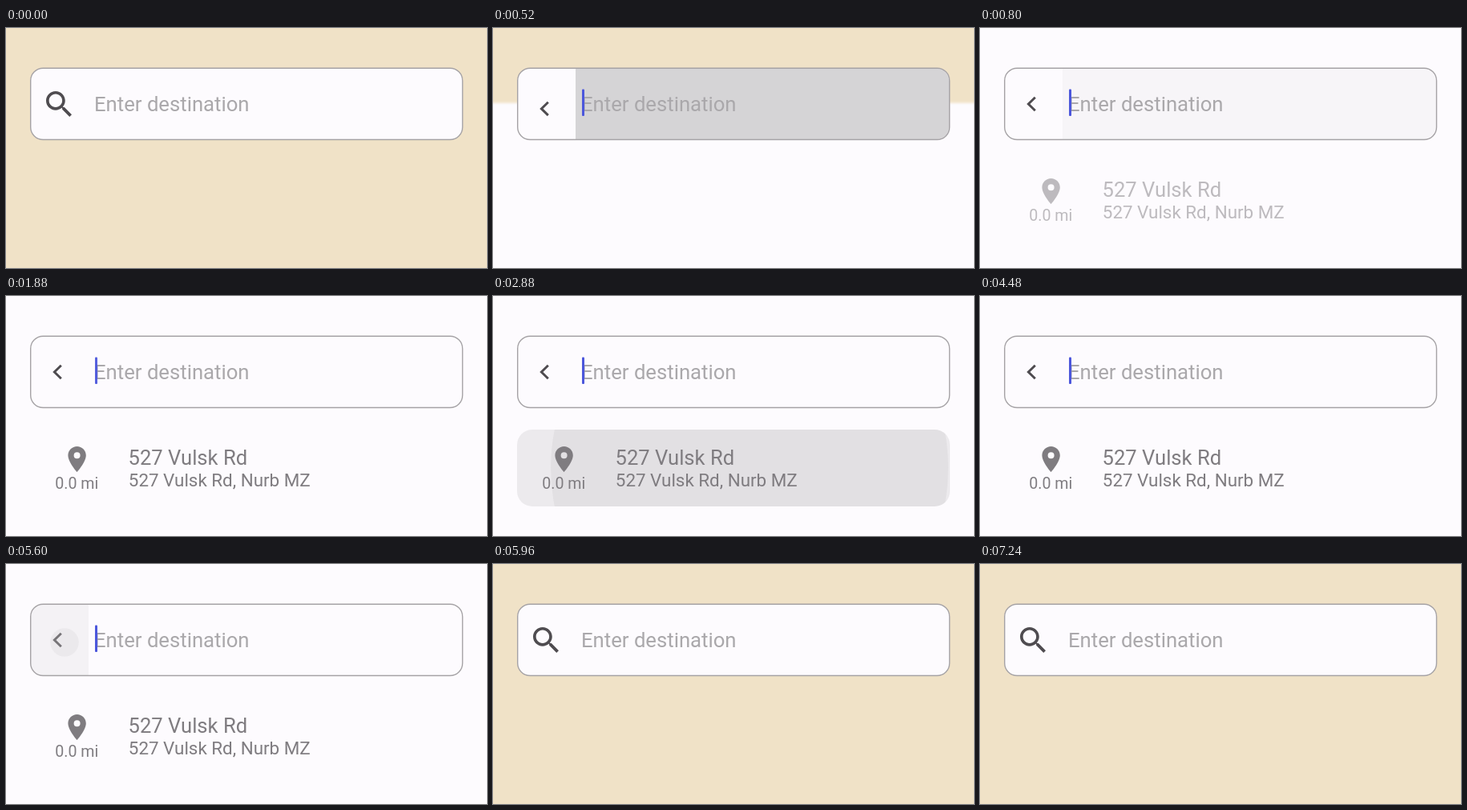
These frames come from a looping animation (600 px wide and 300 px high, 7.92 s). An HTML page:

```html
<!DOCTYPE html>
<html lang="en">
<head>
<meta charset="utf-8">
<title>Destination search</title>
<style>
  html, body { margin: 0; width: 100%; height: 100%; overflow: hidden; background: #f0e2c7; }
  svg { display: block; width: 100vw; height: 100vh; }
  text { font-family: Roboto, sans-serif; }
</style>
</head>
<body>
<svg viewBox="0 0 600 300">
  <defs>
    <clipPath id="inputClip"><path d="M103 51H554a15 15 0 0 1 15 15V124a15 15 0 0 1-15 15H103z"/></clipPath>
    <clipPath id="tileClip"><rect x="30" y="167" width="540" height="96" rx="19"/></clipPath>
    <clipPath id="backClip"><path d="M103 51H46a15 15 0 0 0-15 15V124a15 15 0 0 0 15 15H103z"/></clipPath>
    <filter id="soft" x="-5%" y="-5%" width="110%" height="110%"><feGaussianBlur stdDeviation="1.4"/></filter>
  </defs>

  <rect width="600" height="300" fill="#f0e2c7"/>
  <rect id="sheet" x="-20" width="640" height="340" fill="#fdfbfe" filter="url(#soft)"/>

  <g id="tilePress" clip-path="url(#tileClip)">
    <rect x="30" y="167" width="540" height="96" fill-opacity=".103"/>
    <circle cx="320" cy="215" fill-opacity=".066"/>
  </g>
  <g id="result" fill="#7f7c80">
    <path transform="translate(69.4 184.8) scale(1.6)" d="M12 2C8.13 2 5 5.13 5 9c0 5.25 7 13 7 13s7-7.75 7-13c0-3.87-3.13-7-7-7zm0 9.5a2.5 2.5 0 1 1 0-5 2.5 2.5 0 0 1 0 5z"/>
    <text x="88.3" y="241" font-size="19.6" text-anchor="middle">0.0 mi</text>
    <text x="152.6" y="211" font-size="25.6">527 Vulsk Rd</text>
    <text x="152.8" y="238" font-size="22.4">527 Vulsk Rd, Nurb MZ</text>
  </g>

  <rect x="30.7" y="50.2" width="538.8" height="89.3" rx="15.5" fill="#fdfbfe"/>
  <g id="inputPress" clip-path="url(#inputClip)">
    <rect x="103" y="50" width="467" height="90" fill-opacity=".1"/>
    <circle cx="337" cy="95" fill-opacity=".062"/>
  </g>
  <g id="backPress" clip-path="url(#backClip)">
    <rect x="31" y="50" width="72" height="90" fill-opacity=".035"/>
    <circle cx="73" cy="98" fill-opacity=".035"/>
  </g>
  <rect x="30.7" y="50.2" width="538.8" height="89.3" rx="15.5" fill="none" stroke="#a5a2a5" stroke-width="1.4"/>

  <path id="search" fill="#4f4c50" transform="translate(44.5 73.4) scale(1.83)" d="M15.5 14h-.79l-.28-.27C15.41 12.59 16 11.11 16 9.5 16 5.91 13.09 3 9.5 3S3 5.91 3 9.5 5.91 16 9.5 16c1.61 0 3.09-.59 4.23-1.57l.27.28v.79l5 4.99L20.49 19l-4.99-5zm-6 0C7.01 14 5 11.99 5 9.5S7.01 5 9.5 5 14 7.01 14 9.5 11.99 14 9.5 14z"/>
  <path id="back" d="M68.8 86.8L60.4 95l8.4 8.2" fill="none" stroke="#4f4c50" stroke-width="3"/>
  <text x="110" y="104" font-size="25.7" fill="#aaa8ab">Enter destination</text>
  <rect id="cursor" x="111" y="76.5" width="3" height="33.5" rx="1" fill="#4c57dc"/>
</svg>
<script>
const LOOP = 7920, OPEN = 390, CLOSE = 5640;
const $ = id => document.getElementById(id);
const ramp = (t, from, to) => Math.min(1, Math.max(0, (t - from) / (to - from)));
const fade = (id, value) => $(id).setAttribute('opacity', value);

// A highlight appears at once, a circle spreads over it, then both fade.
function press(id, age, reach, hold, end) {
  fade(id, ramp(age, 0, 90) * (1 - ramp(age, hold, end)));
  const r = reach * (1 - (1 - ramp(age, 0, 450)) ** 2);
  $(id).querySelector('circle').setAttribute('r', r);
}

function sheetTop(t) {
  return t < CLOSE
    ? 300 * (1 - ramp(t, OPEN, 687)) ** 2
    : 300 * ramp(t, CLOSE, 5960) ** 2;
}

function cursorAlpha(t) {
  if (t < 360 || t >= CLOSE) return 0;
  const phase = (t - 287) % 1013;
  return ramp(phase, 0, 120) * (1 - ramp(phase, 570, 770));
}

function draw(t) {
  const top = sheetTop(t);
  $('sheet').setAttribute('y', top >= 300 ? 310 : top < .5 ? -10 : top);

  press('inputPress', t - 120, 250, 460, 720);
  press('tilePress', t < 3200 ? t - 2360 : t - 3320, 248, 430, 700);
  press('backPress', t - 5300, 20, 360, 600);

  fade('result', ramp(t, 680, 920) * (1 - ramp(t, 5620, 5760)));
  fade('search', t < 3000 ? 1 - ramp(t, 360, 440) : ramp(t, 5720, 5860));
  fade('back', ramp(t, 410, 510) * (1 - .25 * ramp(t, 5540, 5600)) * (1 - ramp(t, 5600, 5740)));
  $('back').setAttribute('transform', `translate(0 ${t < CLOSE ? top * 6 / 95 : 0})`);
  fade('cursor', cursorAlpha(t));
}

const start = performance.now();
function tick() {
  draw((performance.now() - start) % LOOP);
  requestAnimationFrame(tick);
}
draw(0);
requestAnimationFrame(tick);
</script>
</body>
</html>
```
